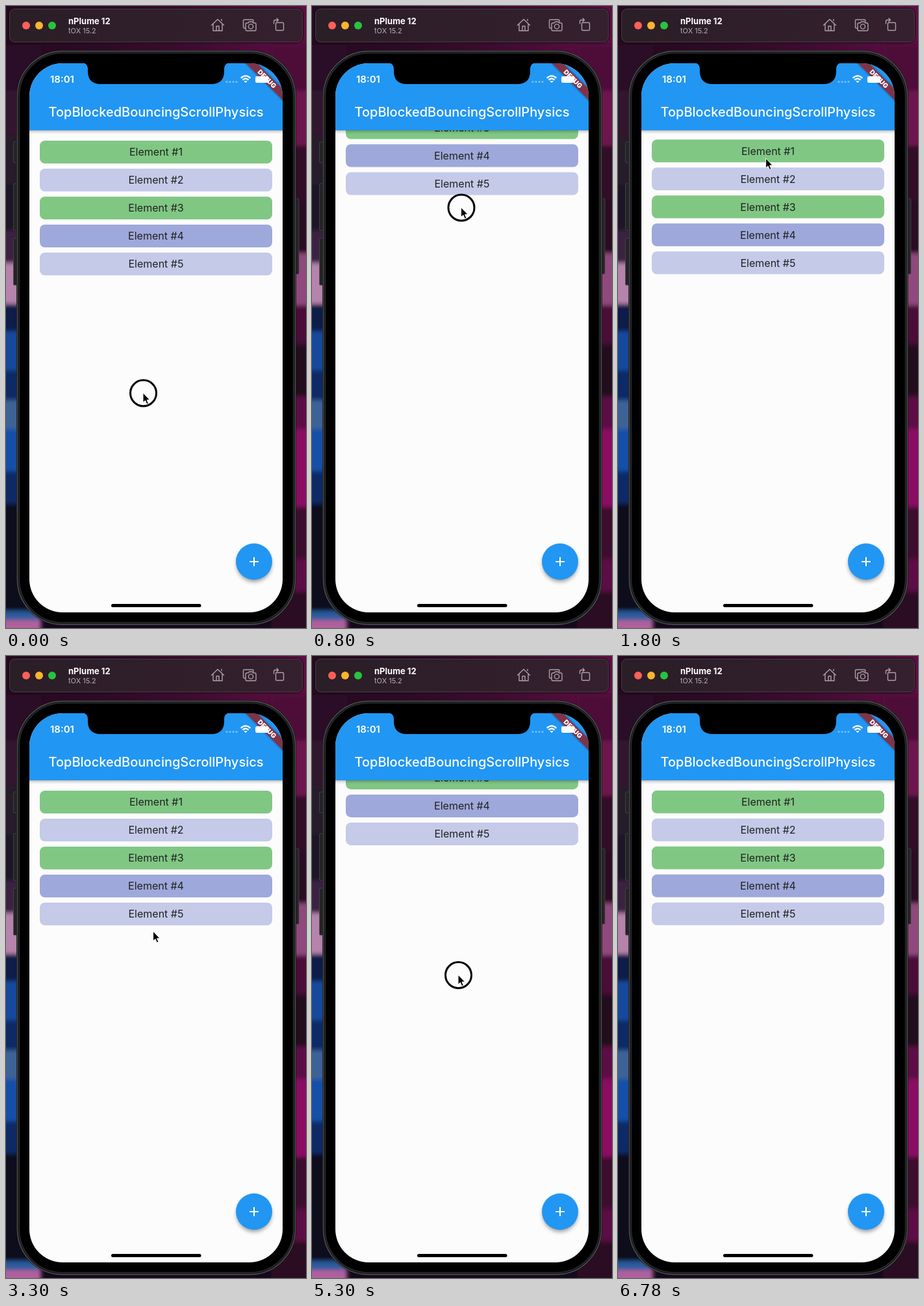
Animation of 462 by 956 pixels, one loop 6970 ms. Source, as an HTML page:

```html
<!DOCTYPE html>
<html lang="en">
<head>
<meta charset="utf-8">
<title>Bouncing scroll demo</title>
<style>
  html, body { margin: 0; width: 100%; height: 100%; overflow: hidden; background: #14091c; }
  svg { display: block; width: 462px; height: 956px; }
  text { font-family: Inter, "Open Sans", sans-serif; }
  .icon { fill: none; stroke: #aaa1a8; stroke-width: 1.4; stroke-linejoin: round; stroke-linecap: round; }
  .btn { fill: #242426; stroke: #4a4a4c; stroke-width: .8; }
  .item { font-size: 16px; fill: #1f2320; text-anchor: middle; }
</style>
</head>
<body>
<svg viewBox="0 0 462 956">
  <defs>
    <linearGradient id="top">
      <stop offset="0" stop-color="#260a20"/><stop offset=".3" stop-color="#2c0a24"/>
      <stop offset=".6" stop-color="#3d0b2f"/><stop offset="1" stop-color="#5e0d43"/>
    </linearGradient>
    <linearGradient id="bar">
      <stop offset="0" stop-color="#2a1e27"/><stop offset="1" stop-color="#35202e"/>
    </linearGradient>
    <linearGradient id="drop" x2="0" y2="1">
      <stop offset="0" stop-opacity=".26"/><stop offset=".4" stop-opacity=".11"/><stop offset="1" stop-opacity="0"/>
    </linearGradient>
    <filter id="soft" x="-50%" y="-10%" width="200%" height="120%"><feGaussianBlur stdDeviation="3"/></filter>
    <filter id="glow" x="-40%" y="-40%" width="180%" height="180%"><feGaussianBlur stdDeviation="3.2"/></filter>
    <clipPath id="screen"><rect x="36" y="88" width="390" height="844" rx="51"/></clipPath>
    <clipPath id="body"><rect x="36" y="191" width="390" height="741"/></clipPath>
  </defs>

  <rect width="462" height="956" fill="#14091c"/>
  <rect width="462" height="110" fill="url(#top)"/>
  <g id="photo" filter="url(#soft)"></g>

  <rect x="4.5" y="3.5" width="453" height="53" rx="9" fill="url(#bar)" stroke="#0d060b"/>
  <rect x="5.5" y="4.5" width="451" height="51" rx="8" fill="none" stroke="#5b4853" stroke-width=".8"/>
  <circle cx="31" cy="30" r="6" fill="#ff5f57"/>
  <circle cx="51" cy="30" r="6" fill="#f9b52e"/>
  <circle cx="71" cy="30" r="6" fill="#28c33f"/>
  <text x="96" y="28" font-size="13" font-weight="700" fill="#fff">nPlume 12</text>
  <text x="96" y="42" font-size="11" fill="#b8aeb5">tOX 15.2</text>
  <g class="icon">
    <path d="M316.5 29.5 326 20.5 335.5 29.5M319 27.5V38H333V27.5M332 22.5V20.5M324 38V31H328V38"/>
    <path d="M368.5 34H367Q365.5 34 365.5 32.5V22.5Q365.5 21 367 21H379.5Q381 21 381 22.5V24"/>
    <path d="M371 26H373L374.2 24.3H379.5L380.7 26H383Q385 26 385 28V36Q385 38 383 38H371Q369 38 369 36V28Q369 26 371 26Z"/>
    <circle cx="377" cy="31.5" r="3.6"/>
    <rect x="415.5" y="25.5" width="12" height="12" rx="1.5"/>
    <path d="M412.5 27V24Q412.5 21.5 415 21.5H419M417 19 419.5 21.5 417 24"/>
  </g>

  <rect class="btn" x="11.5" y="209" width="8" height="32" rx="1.5"/>
  <rect class="btn" x="11.5" y="273" width="8" height="72" rx="1.5"/>
  <rect class="btn" x="11.5" y="357" width="8" height="72" rx="1.5"/>
  <rect class="btn" x="443" y="296" width="8" height="116" rx="1.5"/>
  <rect x="16" y="68" width="431" height="884" rx="71" fill="#111112"/>
  <rect x="17.5" y="69.5" width="428" height="881" rx="69.5" fill="#000" stroke="#555658" stroke-width="1.4"/>
  <rect x="20" y="72" width="423" height="876" rx="67" fill="none" stroke="#242527" stroke-width="2.5"/>

  <g clip-path="url(#screen)">
    <rect x="36" y="88" width="390" height="844" fill="#fcfcfc"/>
    <g clip-path="url(#body)"><g id="list"></g></g>
    <rect x="36" y="191" width="390" height="6" fill="url(#drop)"/>
    <rect x="36" y="88" width="390" height="103" fill="#2196f3"/>
    <text x="231" y="170" font-size="20" font-weight="500" fill="#fff" text-anchor="middle">TopBlockedBouncingScrollPhysics</text>
    <circle cx="382" cy="858" r="27" opacity=".38" filter="url(#glow)"/>
    <circle cx="382" cy="854" r="28" fill="#2196f3"/>
    <path d="M375 854H389M382 847V861" stroke="#fff" stroke-width="2"/>
    <g transform="translate(426 88) rotate(45)">
      <rect x="-60" y="28" width="120" height="12" opacity=".35" filter="url(#soft)"/>
      <rect x="-60" y="28" width="120" height="12" fill="#7f3349"/>
      <text y="37.7" font-size="10.2" font-weight="900" fill="#fff" text-anchor="middle">DEBUG</text>
    </g>
    <rect x="162" y="919" width="138.5" height="5" rx="2.5"/>
    <path d="M117 87Q126 88 126 97V100Q126 120 146 120H316Q336 120 336 100V97Q336 88 345 87Z"/>
    <text x="68" y="118" font-size="15" font-weight="600" fill="#fff">18:01</text>
    <g fill="#fff" opacity=".4">
      <circle cx="340" cy="116.5" r="1.6"/><circle cx="345" cy="116.5" r="1.6"/>
      <circle cx="350" cy="116.5" r="1.6"/><circle cx="355" cy="116.5" r="1.6"/>
    </g>
    <g fill="none" stroke="#fff" stroke-width="2.3">
      <path d="M361.7 110.8Q369 104 376.3 110.8M364.4 113.7Q369 109.4 373.6 113.7"/>
      <path d="M367 115.6H371L369 117.7Z" fill="#fff" stroke-width="1"/>
    </g>
    <rect x="384" y="108" width="20" height="10" rx="2.5" fill="#fff"/>
    <rect x="405" y="111" width="1.5" height="4" rx=".7" fill="#fff" opacity=".6"/>
  </g>

  <g id="pointer">
    <circle id="ring" cx=".5" cy=".5" r="20" fill="none" stroke="#000" stroke-width="3"/>
    <path d="M0 0V15L3.4 11.9 5.9 17.5 8.4 16.4 6 11H10.6Z" stroke="#fff" stroke-width="1" stroke-linejoin="round"/>
  </g>
</svg>
<script>
const LOOP = 6970, VIEW = 741;
const $ = id => document.getElementById(id);
const add = (parent, tag, attrs, text) => {
  const el = document.createElementNS('http://www.w3.org/2000/svg', tag);
  for (const k in attrs) el.setAttribute(k, attrs[k]);
  if (text) el.textContent = text;
  parent.append(el);
};

// soft wallpaper bands beside the phone, each running down to the next
const bands = (x, list) => list.forEach(([y, fill], i) =>
  add($('photo'), 'rect', { x, y, width: 62, height: (list[i + 1] || [964])[0] - y, fill }));
bands(-8, [[60, '#2b0b28'], [130, '#32122f'], [200, '#251a2c'], [275, '#1b1726'], [345, '#3b2442'],
  [395, '#b583ab'], [458, '#101c48'], [500, '#164a9c'], [560, '#0d2a66'], [606, '#3d6396'],
  [650, '#1450a8'], [715, '#0e2a66'], [765, '#0c0c1c'], [930, '#2a5c9c'], [944, '#b0609c']]);
bands(408, [[60, '#4d0b38'], [130, '#6d134e'], [215, '#330b28'], [300, '#2a0a22'], [380, '#8f4a7c'],
  [460, '#4a0f38'], [520, '#23091d'], [600, '#5c0d45'], [650, '#8a0f64'], [770, '#3d0a2f'],
  [850, '#5c0d45'], [900, '#2a0822']]);

['#81c784', '#c5cae9', '#81c784', '#9fa8da', '#c5cae9'].forEach((fill, i) => {
  const y = 207 + 43 * i;
  add($('list'), 'rect', { x: 52, y, width: 358, height: 35, rx: 8, fill });
  add($('list'), 'text', { x: 231, y: y + 23.3, class: 'item' }, 'Element #' + (i + 1));
});

// pointer path: time, x, y
const path = [[0, 211, 594.5], [200, 214, 562], [500, 223, 425], [800, 229.5, 309.5], [1050, 229, 254],
  [1250, 228, 234], [1900, 227.5, 234], [2100, 227, 262], [2600, 226, 640], [2750, 226, 660],
  [3300, 226.5, 423], [3800, 228, 228], [4000, 228, 235], [4200, 222, 468], [4400, 207, 710],
  [4600, 201.5, 773], [5000, 202, 774], [5300, 225, 490], [5600, 251, 201], [5750, 255.5, 176],
  [5950, 256, 176], [6300, 257, 110], [6600, 249, 229], [LOOP, 249, 229]];
const presses = [[0, 1250], [1950, 2700], [3950, 4500], [4900, 5787]];

const slope = (i, k) => (path[i + 1][k] - path[i][k]) / (path[i + 1][0] - path[i][0]);
const tangent = (i, k) => {
  if (i < 1 || i > path.length - 2) return 0;
  const a = slope(i - 1, k), b = slope(i, k);
  return a * b > 0 ? 2 * a * b / (a + b) : 0;
};
const at = (t, k) => {
  let i = 0;
  while (i < path.length - 2 && path[i + 1][0] <= t) i++;
  const [p, q] = [path[i], path[i + 1]], h = q[0] - p[0], u = (t - p[0]) / h, v = 1 - u;
  return p[k] * (1 + 2 * u) * v * v + q[k] * u * u * (3 - 2 * u)
    + h * u * v * (tangent(i, k) * v - tangent(i + 1, k) * u);
};

// rubber band while dragging up, overdamped spring after release
const pull = d => d > 0 ? .52 * d / (1 + .52 * d / VIEW) : 0;
const spring = s => (22.04 * Math.exp(-9.07 * s) - 9.07 * Math.exp(-22.04 * s)) / 12.97;
const scroll = t => {
  const drag = presses.filter(p => p[0] <= t).pop();
  const end = Math.min(t, drag[1]);
  return pull(at(drag[0], 2) - at(end, 2)) * spring((t - end) / 1000);
};

const hold = t => t >= 4600 && t < 5000 ? 4600 : Math.min(6600, Math.floor(t / 100) * 100);

function draw(now) {
  const time = now % LOOP, t = hold(time);
  $('list').setAttribute('transform', `translate(0 ${-scroll(t).toFixed(2)})`);
  $('pointer').setAttribute('transform', `translate(${at(t, 1).toFixed(2)} ${at(t, 2).toFixed(2)})`);
  $('pointer').style.display = time < 6780 ? '' : 'none';
  $('ring').style.display = presses.some(([a, b]) => t >= a && t < b) ? '' : 'none';
  requestAnimationFrame(() => draw(performance.now() - start));
}
const start = performance.now();
draw(0);
</script>
</body>
</html>
```
